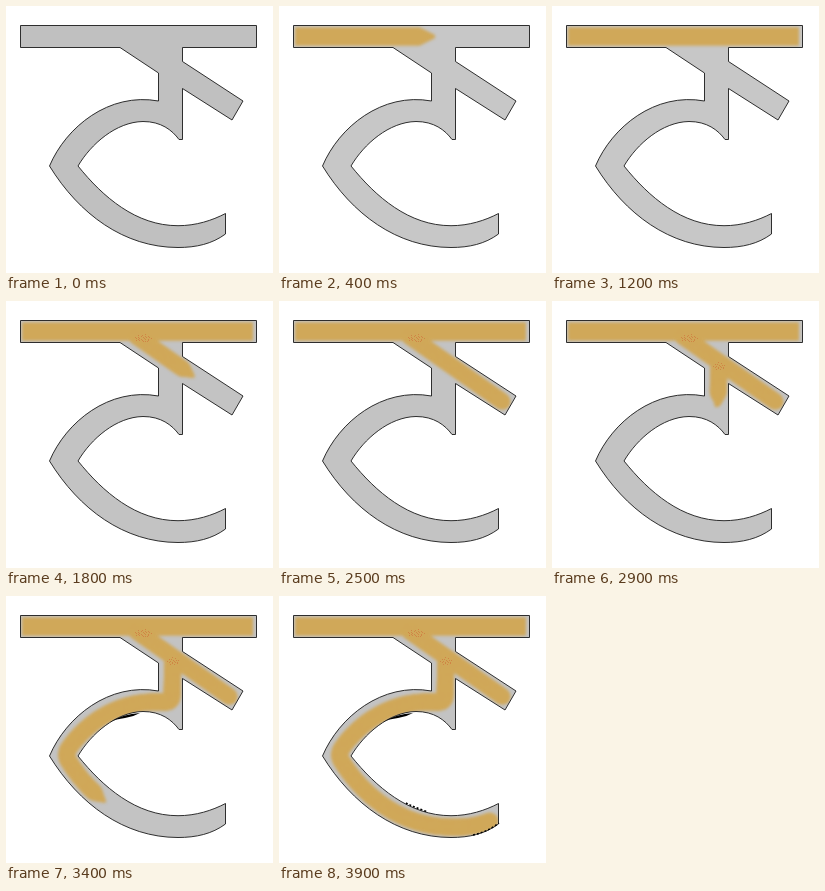
Animation of 267x267 px, one loop 4100 ms. Source, as an HTML page with a canvas:

```html
<!DOCTYPE html>
<html lang="hi">
<head>
<meta charset="utf-8">
<title>Letter tracing</title>
<style>
html, body { margin: 0; width: 100%; height: 100%; overflow: hidden; background: #fff; }
canvas { display: block; width: 267px; height: 267px; }
</style>
</head>
<body>
<canvas id="stage" width="267" height="267"></canvas>
<script>
const SIZE = 267, LOOP = 4100, STEP = 100;
const ctx = document.getElementById('stage').getContext('2d');
const layer = document.createElement('canvas');
layer.width = layer.height = SIZE;
const ink = layer.getContext('2d');

const letter = new Path2D(`M14.5 19.5H250.5V41.5H176.5V55.5L237 95L226 114L176.5 82.5V133.5H173
  C166 124 155 115.5 137 115.5C110 116 85 138 72 160C97 191 130 219.7 172 219.7
  C190 219.7 206 214.5 219.5 207.5V228C206 238 190 241.5 172 241.5C118 241.5 73 208 43.5 160
  C60 121 103 86 152.5 95V67L114 41.5H14.5Z`);
const innerShade = new Path2D('M104 126Q117 118 134 117Q127 121 119 122Q110 123 104 126Z');
const lowerShade = new Path2D('M194 239Q208 236 220 227M127 207Q137 212 149 216');

// keys: [time, drawn length as a fraction of the stroke]
const strokes = [
  { d: 'M17 30.5H246', r: 9, flat: true,
    keys: [[0, 0], [100, .15], [400, .605], [700, .86], [1000, 1]] },
  { d: 'M130 35L224 101', r: 8.3,
    keys: [[1500, 0], [1600, .22], [1800, .61], [2100, 1]] },
  { d: `M167 64L166 100Q166 107 156 106C120 104 86 120 63 152Q59 158 62 164
        C88 207 130 231 172 231Q194 232 211 225`, r: 8.6,
    keys: [[2600, 0], [2900, .12], [3400, .655], [3900, 1]] }
].map(s => {
  const path = document.createElementNS('http://www.w3.org/2000/svg', 'path');
  path.setAttribute('d', s.d);
  const length = path.getTotalLength();
  const points = [];
  for (let i = 0; i <= length; i++) points.push(path.getPointAtLength(i));
  return { ...s, points, length };
});

function valueAt(keys, t) {
  if (t <= keys[0][0]) return keys[0][1];
  for (let i = 1; i < keys.length; i++) {
    const [t0, a] = keys[i - 1], [t1, b] = keys[i];
    if (t <= t1) return a + (b - a) * (t - t0) / (t1 - t0);
  }
  return keys[keys.length - 1][1];
}

function drawStroke(s, t) {
  const part = valueAt(s.keys, t);
  if (!part) return;
  const end = part * s.length;
  for (let i = 0; i < s.points.length && i <= end; i++) {
    const { x, y } = s.points[i];
    const r = part === 1 ? s.r : Math.min(s.r, 1.5 + (end - i) * .5);
    if (s.flat) {
      ink.fillRect(x - 1, y - r, 2, 2 * r);
    } else {
      ink.beginPath();
      ink.arc(x, y, r, 0, 2 * Math.PI);
      ink.fill();
    }
  }
}

function drawSpecks(cx, cy, rx, ry, count) {
  ctx.fillStyle = 'rgba(208, 104, 56, .55)';
  for (let i = 0; i < count; i++) {
    const a = i * 2.4, k = Math.sqrt((i + .5) / count);
    ctx.fillRect(Math.round(cx + rx * k * Math.cos(a)), Math.round(cy + ry * k * Math.sin(a)), 1, 1);
  }
}

function render(time) {
  const t = Math.floor(time % LOOP / STEP) * STEP;

  ink.clearRect(0, 0, SIZE, SIZE);
  ink.fillStyle = '#d0a859';
  for (const s of strokes) drawStroke(s, t);

  ctx.fillStyle = '#fff';
  ctx.fillRect(0, 0, SIZE, SIZE);
  ctx.fillStyle = t < 100 ? '#c0c0c0' : t < 1500 ? '#c7c7c7' : '#c3c3c3';
  ctx.fill(letter);

  ctx.save();
  ctx.clip(letter);
  ctx.filter = 'blur(1.7px)';
  ctx.drawImage(layer, 0, 0);
  ctx.restore();

  if (t >= 1600) drawSpecks(137, 37, 9, 4, 26);
  if (t >= 2700) drawSpecks(167, 65, 6, 4, 18);

  ctx.strokeStyle = '#1a1a1a';
  ctx.lineWidth = .9;
  ctx.stroke(letter);

  ctx.fillStyle = ctx.strokeStyle = '#000';
  if (t >= 3200) ctx.fill(innerShade);
  if (t >= 3800) {
    ctx.save();
    ctx.lineWidth = 1.5;
    ctx.setLineDash([2, 2]);
    ctx.stroke(lowerShade);
    ctx.restore();
  }
}

const start = performance.now();
function tick() {
  render(performance.now() - start);
  requestAnimationFrame(tick);
}
tick();
</script>
</body>
</html>
```
